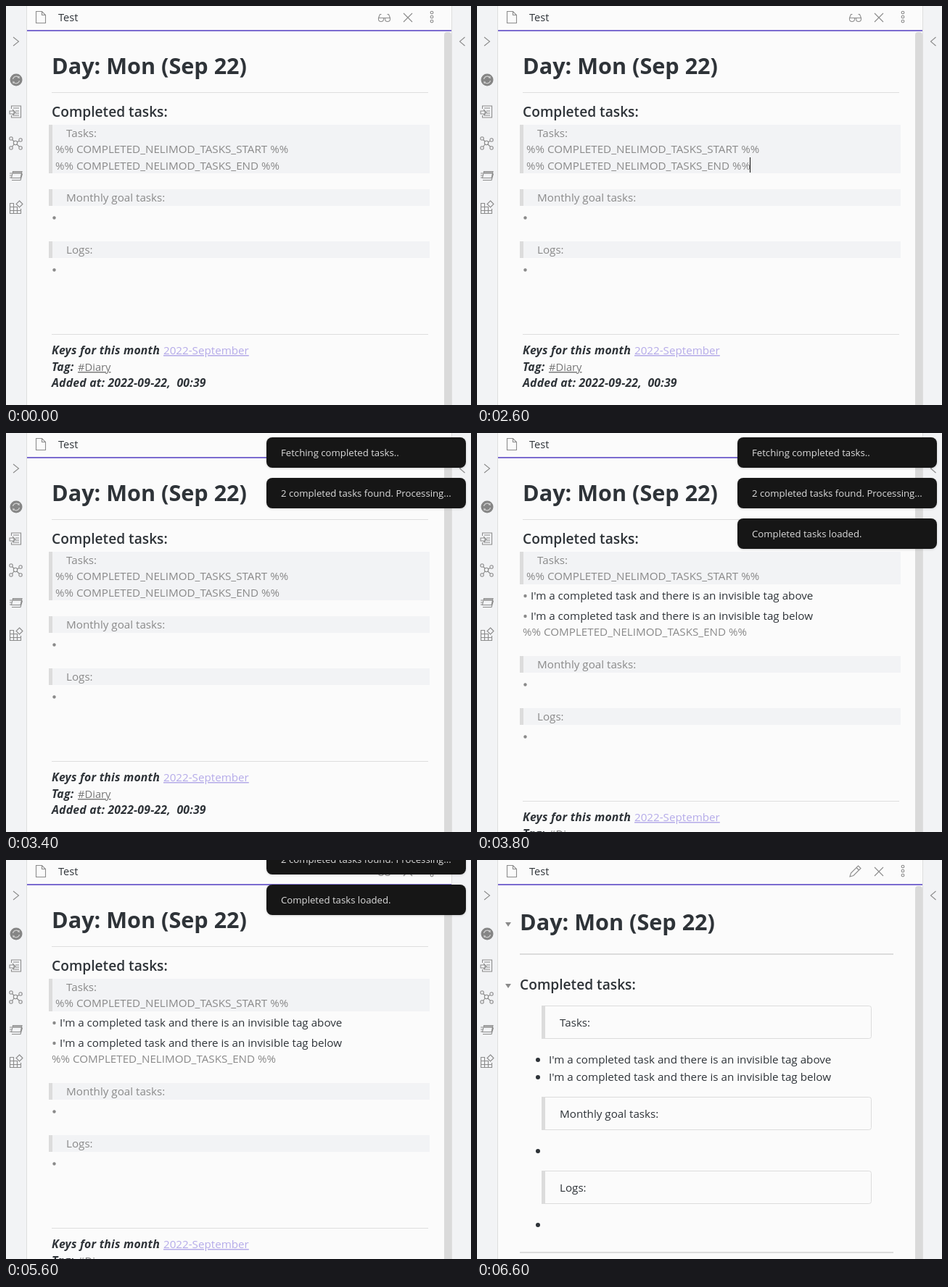
An HTML page for the animation above (8 s loop, 641 by 551 pixels).

```html
<!DOCTYPE html>
<html lang="en">
<head>
<meta charset="utf-8">
<title>Daily note</title>
<style>
html, body { margin: 0; width: 100%; height: 100%; overflow: hidden; background: #fbfbfb; }
svg { display: block; width: 641px; height: 551px; }
text { font: 15.2px "Open Sans", "Noto Sans", sans-serif; fill: #2e3338; white-space: pre; }
.h1 { font-size: 30.6px; font-weight: 700; }
.h2 { font-size: 19.2px; font-weight: 600; }
.dim { fill: #8a8a8a; }
.key { font-size: 15.8px; font-weight: 700; font-style: italic; letter-spacing: .2px; }
.link { fill: #b5abe9; text-decoration: underline; }
.tag { fill: #777; font-size: 14.7px; text-decoration: underline; }
.title { font-size: 14.7px; font-weight: 500; }
.toast { font-size: 13.2px; fill: #dadada; }
.icon { fill: none; stroke: #8c8c8c; stroke-width: 1.1; }
</style>
</head>
<body>
<svg viewBox="0 0 641 551">
  <defs>
    <filter id="shadow" x="-10%" y="-30%" width="120%" height="170%">
      <feDropShadow dx="0" dy="1" stdDeviation="1.5" flood-opacity=".15"/>
    </filter>
  </defs>
  <rect width="641" height="551" fill="#fbfbfb"/>
  <g id="edit"></g>
  <g id="read"></g>
  <g id="frame"></g>
  <g id="toasts" filter="url(#shadow)"></g>
</svg>
<script>
const $ = id => document.getElementById(id);
const text = (x, y, s, c = '') => `<text x="${x}" y="${y}" class="${c}">${s}</text>`;
const rect = (x, y, w, h, fill, more = '') =>
  `<rect x="${x}" y="${y}" width="${w}" height="${h}" fill="${fill}" ${more}/>`;
const dot = (x, y, r, fill) => `<circle cx="${x}" cy="${y}" r="${r}" fill="${fill}"/>`;
const icon = (d, id = '') => `<path class="icon" id="${id}" d="${d}"/>`;
const ring = (x, y, r) => `M${x - r} ${y}a${r} ${r} 0 1 0 ${2 * r} 0a${r} ${r} 0 1 0 ${-2 * r} 0`;
const fold = (x, y, id = '') => `<path id="${id}" fill="#8a8a8a" d="M${x - 4} ${y - 3}h8l-4 6z"/>`;

// Editing view
const quote = (y, h) => rect(59, y, 525, h, '#f2f3f5') + rect(59, y, 5, h, '#dcdcdc');
const marker = side => `%% COMPLETED_NELIMOD_TASKS_${side} %%`;
const items = ['above', 'below'].map(w => `I'm a completed task and there is an invisible tag ${w}`);

$('edit').innerHTML =
  text(63, 94, 'Day: Mon (Sep 22)', 'h1') + rect(63, 119, 519, 1, '#dedede') +
  fold(54, 145.5, 'hoverFold') +
  text(63, 153, 'Completed tasks:', 'h2') +
  `<g id="before">${quote(164, 67)}${text(68, 226, marker('END'), 'dim')}</g>` +
  `<g id="after">${quote(164, 45)}${text(63, 280, marker('END'), 'dim')}` +
  items.map((s, i) => dot(66.5, 225 + 28 * i, 2.2, '#8a8a8a') + text(74, 230 + 28 * i, s)).join('') + '</g>' +
  text(83, 181, 'Tasks:', 'dim') + text(68, 203, marker('START'), 'dim') +
  rect(0, 0, 1, 21, '#111', 'id="caret"') +
  '<g id="lower">' +
  quote(253, 23) + text(83, 270, 'Monthly goal tasks:', 'dim') + dot(66.5, 292.5, 2.2, '#8a8a8a') +
  quote(325, 23) + text(83, 342, 'Logs:', 'dim') + dot(66.5, 364.5, 2.2, '#8a8a8a') +
  rect(63, 453, 519, 1, '#dedede') +
  text(63, 481, 'Keys for this month', 'key') + text(208, 481, ':') + text(217, 481, '2022-September', 'link') +
  text(63, 504, 'Tag:', 'key') + text(99, 504, '#Diary', 'tag') +
  text(63, 526, 'Added at: 2022-09-22,  00:39', 'key') + '</g>';

// Reading view
const card = (y, s) =>
  rect(89.5, y + .5, 454, 45, 'none', 'rx="3" stroke="#dcdcdc"') +
  rect(89, y, 5, 46, '#dcdcdc') + text(114, y + 29, s);

$('read').innerHTML =
  fold(43, 89) + text(59, 97, 'Day: Mon (Sep 22)', 'h1') + rect(59, 129, 515, 2, '#dcdcdc') +
  fold(43, 174) + text(59, 179, 'Completed tasks:', 'h2') +
  card(201, 'Tasks:') + card(327, 'Monthly goal tasks:') + card(429, 'Logs:') +
  items.map((s, i) => text(99, 281 + 24 * i, s)).join('') +
  [276, 300, 402, 504].map(y => dot(84, y, 3, '#2e3338')).join('') +
  rect(59, 541, 515, 2, '#dcdcdc');

// Window frame and icons
$('frame').innerHTML =
  rect(0, 0, 28, 551, '#f2f3f5') + rect(28, 0, 1, 551, '#dedede') +
  rect(615, 0, 26, 551, '#f2f3f5') + rect(614, 0, 1, 551, '#dedede') +
  rect(604, 36, 10, 530, '#dadada', 'rx="4"') +
  rect(29, 33, 585, 2, '#7b6cd0') +
  text(72, 21, 'Test', 'title') +
  icon('M10 43l7.5 6l-7.5 6M632.5 43l-7 6l7 6') +
  icon('M41.5 7.5h8l5 5v11h-13zM49.5 7.5v5h5') +
  icon('M548 10l12 12M560 10l-12 12') +
  icon([9, 15, 21].map(y => ring(587, y, 1.8)).join('')) +
  icon('M513 16.5h17M513.5 16.5v1.5a3.5 3.5 0 0 0 7 0v-1.5M522.5 16.5v1.5a3.5 3.5 0 0 0 7 0v-1.5' +
    'M513.5 16.5l2-5h2M529.5 16.5l-2-5h-2', 'glasses') +
  icon('M514 23l1.5-5l10-10l3.5 3.5l-10 10zM523 10.5l3.5 3.5', 'pencil') +
  dot(14, 102, 8.5, '#858585') +
  '<path fill="none" stroke="#d2d2d2" stroke-width="1.2" d="M9.5 101a4.8 4.8 0 0 1 8.5-2v-2m0 2h-2M18.5 103a4.8 4.8 0 0 1-8.5 2v2m0-2h2"/>' +
  icon('M7.5 142v-4h13v16h-13v-3M10 141h8M13 145h5M13 148h5M10 151h8M5 145h6v4h-6zM9 143l4 4l-4 4') +
  icon(ring(13, 189, 2.7) + ring(7, 183, 2.2) + ring(20, 185, 2.2) + ring(7, 196, 2.2) + ring(20, 196, 2.2) +
    'M8.5 184.5l3 3M15.5 188l3-2M11 191l-2.5 3.500M15 191l3.5 3.5') +
  icon('M9.5 228.5h12.5l-2 9h-12.500zM9.5 230h12M9.5 231h12M5 231h3M5 234h3M5 237h2M8 240.500h12l2.500-9') +
  icon('M5.5 272v15M10.5 272v15M15.5 277v10M20.5 280v7M5 272.5h6M5 277.5h11M5 282.5h16M5 286.5h16' +
    'M18.5 269l4.5 4.5l-4.5 4.5l-4.5-4.5z');

const toasts = [
  { s: 'Fetching completed tasks..', w: 204, start: 2900, out: 5200 },
  { s: '2 completed tasks found. Processing...', w: 275, start: 3200, out: 5600 },
  { s: 'Completed tasks loaded.', w: 192, start: 3510, out: 6000 }
];
$('toasts').innerHTML = toasts.map(n =>
  `<g>${rect(0, 0, 0, 42, '#191919', 'rx="8"')}${text(20, 26, n.s, 'toast')}</g>`).join('');
toasts.forEach((n, i) => n.el = $('toasts').children[i]);

const clamp = v => Math.min(1, Math.max(0, v));
const show = (el, on) => el.style.display = on ? '' : 'none';

// All toasts share the width of the widest one and close up as the first leaves
function drawToasts(t) {
  const alive = n => t >= n.start + 100 && t < n.out + 100;
  const width = Math.max(...toasts.filter(alive).map(n => n.w));
  let y = 6;
  for (const n of toasts) {
    const slide = 215 * (1 - clamp((t - n.start) / 200)) ** 1.4;
    const gone = clamp((t - n.out + 100) / 200);
    show(n.el, alive(n));
    y -= 56 * gone;
    if (alive(n)) {
      n.el.firstChild.setAttribute('width', width);
      n.el.setAttribute('transform', `translate(${634 - width + slide} ${y})`);
    }
    y += 56;
  }
}

function draw(t) {
  const loaded = t >= 3700, reading = t >= 6500;
  show($('edit'), !reading);
  show($('read'), reading);
  show($('glasses'), !reading);
  show($('pencil'), reading);
  show($('before'), !loaded);
  show($('after'), loaded);
  show($('hoverFold'), t >= 400 && t < 800);
  $('lower').setAttribute('transform', `translate(0 ${loaded ? 55 : 0})`);

  // The caret moves one line down, then blinks until focus is lost
  const below = t >= 1600;
  show($('caret'), t >= 1200 && t < 2100 || t >= 2600 && t < 2800);
  $('caret').setAttribute('x', below ? 376 : 388);
  $('caret').setAttribute('y', below ? 209 : 186);
  drawToasts(t);
}

function tick() {
  draw(Math.floor(performance.now() % 8000 / 100) * 100);
  requestAnimationFrame(tick);
}
tick();
</script>
</body>
</html>
```
